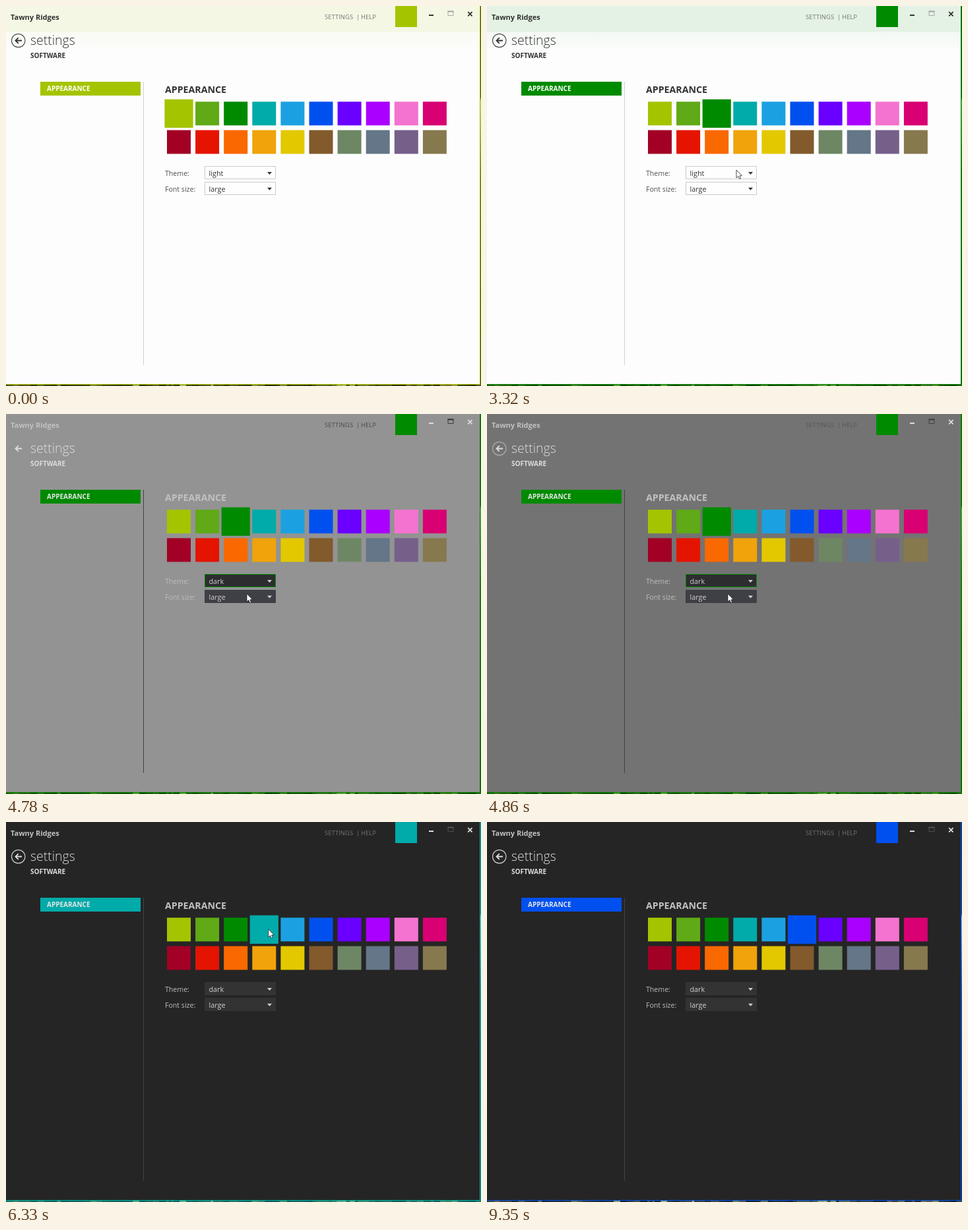
Animation of 720 by 577 pixels, one loop 9.43 s. Source, as an HTML page:

```html
<!DOCTYPE html>
<html lang="en">
<head>
<meta charset="utf-8">
<title>Appearance settings</title>
<style>
html, body { margin: 0; width: 100%; height: 100%; overflow: hidden; background: #fdfdfd; }
svg {
  display: block; width: 720px; height: 577px;
  font-family: "Open Sans", "Noto Sans", sans-serif;
  --text: #333; --strong: #333; --label: #505050; --nav: #fff;
  --line: #cfcfcf; --field: #fefefe; --edge: #cbcbcb; --hover: #fefefe;
  --value: #333; --dim: #777; --maxi: #a8a8a8; --ring: #555;
}
svg.dark {
  --text: #c1c1c1; --strong: #dcdcdc; --label: #bdbdbd; --nav: #e4e4e4;
  --line: #434345; --field: #333334; --edge: #333334; --hover: #3f3f46;
  --value: #d0d0d0;
}
.accent { fill: var(--accent); }
.bold { font-weight: 700; }
.text { fill: var(--text); }
.strong { fill: var(--strong); }
.label { fill: var(--label); font-size: 10.6px; }
.value { fill: var(--value); font-size: 10.8px; }
.link { fill: var(--dim); font-size: 9.5px; }
.small { font-size: 10px; }
.icon { fill: none; stroke: var(--strong); stroke-width: 1.8; }
.field { fill: var(--field); stroke: var(--edge); }
.field.hover { fill: var(--hover); stroke: var(--hover); }
svg:not(.dark) .field.hover { stroke: var(--edge); }
.field.focus { stroke: var(--accent); }
.dark .field.focus { fill: #2d2d30; }
.swatch { transform-box: fill-box; transform-origin: center; }
.swatch.big { transform: scale(1.2); }
.dark #tint { display: none; }
</style>
</head>
<body>
<svg id="stage" viewBox="0 0 720 577">
  <defs>
    <linearGradient id="fade" x2="0" y2="1">
      <stop offset="0" stop-color="var(--accent)" stop-opacity=".1"/>
      <stop offset=".55" stop-color="var(--accent)" stop-opacity=".1"/>
      <stop offset=".57" stop-color="var(--accent)" stop-opacity=".035"/>
      <stop offset=".77" stop-color="var(--accent)" stop-opacity=".025"/>
      <stop offset="1" stop-color="var(--accent)" stop-opacity="0"/>
    </linearGradient>
    <linearGradient id="side" x2="0" y2="1">
      <stop offset="0" stop-color="#33351f"/>
      <stop offset=".24" stop-color="#3a4026"/>
      <stop offset=".25" stop-color="#cfd6c0"/>
      <stop offset=".29" stop-color="#b5bfa5"/>
      <stop offset=".45" stop-color="#4c5533"/>
      <stop offset="1" stop-color="#22210f"/>
    </linearGradient>
  </defs>

  <g id="desktop">
    <rect width="720" height="577" fill="#23210f"/>
    <rect x="719" width="1" height="577" fill="url(#side)"/>
  </g>
  <rect id="glow" class="accent" width="720" height="577"/>
  <rect class="accent" width="719" height="575"/>
  <rect id="window" width="718" height="574"/>
  <rect id="tint" width="718" height="70" fill="url(#fade)"/>

  <text class="text bold" x="7" y="21" font-size="11">Tawny Ridges</text>
  <text class="link" x="483" y="19.5">SETTINGS</text>
  <text class="link" x="531" y="19.5">|</text>
  <text class="link" x="538" y="19.5">HELP</text>
  <rect class="accent" x="590" width="33" height="32"/>
  <path class="icon" d="M641 14H648M700.2 8.9L706.6 15.3M706.6 8.9L700.2 15.3"/>
  <path d="M670 8H678V14.5H670Z" fill="none" stroke="var(--maxi)"/>
  <path d="M669.5 8.3H678.5" stroke="var(--maxi)" stroke-width="2"/>

  <circle cx="18.7" cy="52.5" r="10.2" fill="none" stroke="var(--ring)" stroke-width="1.2"/>
  <path class="icon" stroke-width="2" d="M14.5 52.5H24M18.8 48.2L14.5 52.5L18.8 56.8"/>
  <text class="strong" x="37" y="59" font-size="19.4" font-weight="300">settings</text>
  <text class="strong bold small" x="37" y="79.3">SOFTWARE</text>

  <rect class="accent" x="52" y="115" width="152" height="21"/>
  <text class="bold small" x="62" y="129.2" fill="var(--nav)">APPEARANCE</text>
  <path d="M208.5 115V545" stroke="var(--line)"/>
  <text class="text bold" x="241" y="132" font-size="14.2">APPEARANCE</text>
  <g id="swatches"></g>

  <text class="label" x="241" y="258">Theme:</text>
  <rect id="themeBox" class="field" x="301.5" y="243.5" width="107" height="19"/>
  <text id="theme" class="value" x="307.5" y="258">light</text>
  <text class="label" x="241" y="281.5">Font size:</text>
  <rect id="sizeBox" class="field" x="301.5" y="267.5" width="107" height="19"/>
  <text class="value" x="307.5" y="282">large</text>
  <path d="M396 252H403L399.5 256ZM396 275.7H403L399.5 279.7Z" fill="var(--value)"/>

  <g id="popup">
    <rect x="301.5" y="263.5" width="107" height="39" fill="#fefefe" stroke="#cbcbcb"/>
    <rect id="mark" class="accent" x="302" width="106" height="19"/>
    <text id="opt0" class="value" x="307.5" y="277">dark</text>
    <text id="opt1" class="value" x="307.5" y="296">light</text>
  </g>

  <path id="cursor" d="M0 0V12L2.8 9.6L4.6 13.6L6.6 12.7L4.9 8.9L8.4 8.6Z" fill="#fff" stroke="#222" stroke-width=".8"/>
</svg>
<script>
const LOOP = 9430;
const $ = id => document.getElementById(id);
const stage = $('stage');
const colors = ('a4c400 60a917 008a00 00aba9 1ba1e2 0050ef 6a00ff aa00ff f472d0 d80073 ' +
  'a20025 e51400 fa6800 f0a30a e3c800 825a2c 6d8764 647687 76608a 87794e')
  .split(' ').map(c => '#' + c);

function addRect(parent, x, y, width, height, fill) {
  const el = document.createElementNS('http://www.w3.org/2000/svg', 'rect');
  const attrs = { x, y, width, height, fill };
  for (const key in attrs) el.setAttribute(key, attrs[key]);
  return parent.appendChild(el);
}

const swatches = colors.map((color, i) => {
  const x = 244 + (i % 10) * 43.1, y = i < 10 ? 145.3 : 188.5;
  const el = addRect($('swatches'), x, y, 36, 36, color);
  el.classList.add('swatch');
  return { el, x, y };
});

// Strip of grass under the window
let seed = 7;
const random = () => (seed = (seed * 16807) % 2147483647) / 2147483647;
for (let x = 0; x < 720;) {
  const w = 2 + random() * 9;
  const hue = 35 + random() * 45, light = 6 + random() * random() * 55;
  addRect($('desktop'), x, 575, w, 2, `hsl(${hue} 35% ${light}%)`);
  x += w;
}

const smooth = u => u * u * (3 - 2 * u);
const linear = u => u;
const easeOut = u => 1 - (1 - u) ** 3;

// Pointer travel: first and last change, number of changes, easing, curve points
const moves = [
  [130, 1070, 13, easeOut, [[709, 655], [310, 164]]],
  [1850, 2000, 3, smooth, [[310, 164], [349, 164]]],
  [2690, 3150, 7, smooth, [[349, 164], [414, 165], [363, 261]]],
  [3320, 3320, 1, linear, [[363, 261], [378, 249]]],
  [3780, 4010, 4, smooth, [[378, 249], [365, 273]]],
  [5320, 5700, 6, smooth, [[365, 273], [372, 205], [391, 163]]],
  [6330, 6560, 4, smooth, [[391, 163], [434, 162]]],
  [6800, 7040, 4, smooth, [[434, 162], [478, 159]]],
  [7970, 8590, 9, linear, [[478, 159], [405, 190], [382, 343], [694, 661]]]
];
const clicks = [[0, 0], [1300, 1], [2230, 2], [5930, 3], [6640, 4], [7190, 5]];
const darkening = [[0, 0], [4470, .03], [4620, .255], [4700, .375], [4780, .49],
  [4850, .64], [4930, .82], [5010, 1]];

const latest = (list, t) => list.filter(item => item[0] <= t).pop();

function bezier(points, u) {
  while (points.length > 1) {
    points = points.slice(1).map((p, i) => p.map((v, j) => points[i][j] + (v - points[i][j]) * u));
  }
  return points[0];
}

function pointer(t) {
  const move = latest(moves, t);
  if (!move || t >= 8590) return null;
  const [start, end, count, ease, points] = move;
  const gap = (end - start) / (count - 1) || 1;
  const step = Math.min(count, 1 + Math.floor((t - start) / gap + 1e-6));
  return bezier(points, ease(step / count));
}

const inside = (p, x, y, w, h) =>
  !!p && p[0] >= x && p[0] < x + w && p[1] >= y && p[1] < y + h;
const gray = v => `rgb(${v},${v},${v})`;

function render(t) {
  const accent = latest(clicks, t)[1];
  const p = latest(darkening, t)[1];
  const dark = t >= 4470;
  const tip = pointer(t);
  const open = t >= 3470 && t < 4390;

  stage.classList.toggle('dark', dark);
  const vars = {
    accent: colors[accent],
    dim: dark ? gray(35 + 80 * p) : '',
    maxi: dark ? gray(35 + 45 * p) : '',
    ring: dark ? gray(Math.min(200, 60 + 175 * p)) : ''
  };
  for (const key in vars) stage.style.setProperty('--' + key, vars[key]);
  $('window').setAttribute('fill', gray(253 - 216 * p));
  $('glow').setAttribute('opacity', t < 1300 || t >= 9350 ? .15 : .45);

  swatches.forEach(({ el, x, y }, i) =>
    el.classList.toggle('big', i === accent || inside(tip, x, y, 36, 36)));

  $('theme').textContent = t >= 4390 ? 'dark' : 'light';
  $('themeBox').classList.toggle('focus', t >= 3470 && t < 5930);
  $('themeBox').classList.toggle('hover', inside(tip, 301, 243, 108, 20));
  $('sizeBox').classList.toggle('hover', !open && inside(tip, 301, 267, 108, 20));

  $('popup').style.display = open ? '' : 'none';
  $('popup').style.opacity = t < 3550 ? .5 : 1;
  const row = inside(tip, 301, 264, 108, 19) ? 0 : 1;
  $('mark').setAttribute('y', 264 + 19 * row);
  [0, 1].forEach(i => { $('opt' + i).style.fill = i === row ? '#fff' : ''; });

  $('cursor').style.display = tip ? '' : 'none';
  if (tip) $('cursor').setAttribute('transform', `translate(${tip[0]} ${tip[1]})`);
}

const began = performance.now();
function tick() {
  render((performance.now() - began) % LOOP);
  requestAnimationFrame(tick);
}
tick();
</script>
</body>
</html>
```
